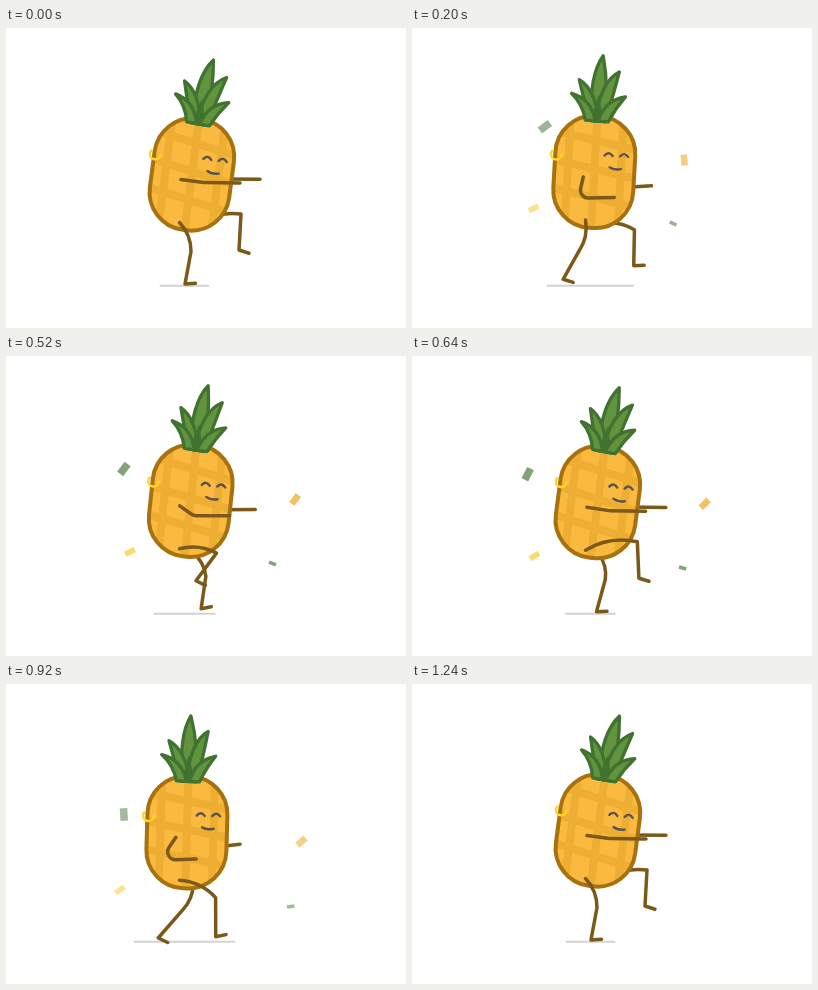
These frames come from a looping animation (400 by 300 pixels, 1.28 s). An HTML page with a canvas:

```html
<!DOCTYPE html>
<html lang="en">
<head>
<meta charset="utf-8">
<title>Dancing pineapple</title>
<style>
  html, body { margin: 0; width: 100%; height: 100%; overflow: hidden; background: #fff; }
  canvas { display: block; width: 400px; height: 300px; }
</style>
</head>
<body>
<canvas id="stage"></canvas>
<script>
const LOOP = 1280, TICK = 40, CYCLE = 1240;
const LIMB = '#7b5a19', FACE = '#5b5350';
const canvas = document.getElementById('stage');
const ctx = canvas.getContext('2d');
const scale = window.devicePixelRatio || 1;
canvas.width = 400 * scale;
canvas.height = 300 * scale;

// Evenly timed stride poses: knee x, y, ankle x, y (heights below the body centre)
const STRIDE = [
  [185, 77, 179, 109.5],
  [169.5, 79, 156.5, 107.5],
  [168, 76.5, 144.5, 105],
  [199.5, 61, 170, 85],
  [225, 39.5, 225, 75.5],
  [214, 54, 215.5, 89],
  [209, 66, 209, 105],
  [193, 74, 191.5, 107]
];

const rad = deg => deg * Math.PI / 180;
const arc = (peak, curve, offset) => peak + curve * offset * offset;

// Each path gives x, y and angle after s seconds
const CONFETTI = [
  { color: '#82a477', w: 12.5, h: 7.5,
    path: s => [arc(115.3, 65, s - 0.72), 90 + 44 * s, arc(-34, -70, s)] },
  { color: '#f3c165', w: 11, h: 6.5,
    path: s => [arc(295.5, -52, s - 0.87), 125 + 35.5 * s, arc(-40, -130, s - 0.85)] },
  { color: '#fbda6c', w: 10.5, h: 5.5,
    path: s => [arc(124.3, -45, s - 0.44), arc(207, -33, s - 1.1), arc(-24, -25, s - 0.2)] },
  { color: '#82a477', w: 7.5, h: 3.5,
    path: s => [arc(261, 40, s - 0.15), 188 + 37.5 * s, arc(27, -85, s - 0.28)] }
];

// Base ends, side controls and tip; curl moves the tip as the body tilts
const BACK_LEAVES = [
  { base: [-6, 7], left: [-12, -45], tip: [-0.8, -65.5], right: [9, -34], curl: 0.6 },
  { base: [-8, 2], left: [-15, -20], tip: [-21.4, -39.8], right: [-5, -32], curl: 0 },
  { base: [-2, 8], left: [0, -40], tip: [17.2, -50.7], right: [14, -28], curl: 0.4 }
];
const FRONT_LEAVES = [
  { base: [-12, -2], left: [-16, -16], tip: [-28, -25.5], right: [-8, -22], curl: 0 },
  { base: [1, 11], left: [6, -22], tip: [26, -26.4], right: [17, -14], curl: 0 }
];

function stroke(color, width) {
  ctx.strokeStyle = color;
  ctx.lineWidth = width;
  ctx.stroke();
}

function line(x1, y1, x2, y2, color, width) {
  ctx.beginPath();
  ctx.moveTo(x1, y1);
  ctx.lineTo(x2, y2);
  stroke(color, width);
}

function faceCurve(x1, y1, cx, cy, x2, y2) {
  ctx.beginPath();
  ctx.moveTo(x1, y1);
  ctx.quadraticCurveTo(cx, cy, x2, y2);
  stroke(FACE, 2.4);
}

// Smooth closed path through the stride poses, phase 0..1
function stride(phase) {
  const n = STRIDE.length, pos = phase % 1 * n, i = Math.floor(pos), u = pos - i;
  const [a, b, c, d] = [-1, 0, 1, 2].map(k => STRIDE[(i + k + n) % n]);
  return b.map((v, k) => v + u / 2 * (c[k] - a[k] +
    u * (2 * a[k] - 5 * v + 4 * c[k] - d[k] + u * (3 * (v - c[k]) + d[k] - a[k]))));
}

function leg(phase, bodyY, hipX, hipY, kneeShift, footShift) {
  const pose = stride(phase);
  const kx = pose[0] + kneeShift, ky = pose[1] + bodyY;
  const ax = pose[2] + footShift, ay = pose[3] + bodyY;
  const dx = kx - hipX, dy = ky - hipY;
  const pitch = rad(7 + 22 * Math.cos(2 * Math.PI * phase - 2.1));
  ctx.beginPath();
  ctx.moveTo(hipX, hipY);
  ctx.quadraticCurveTo(hipX + dx / 2 + dy * 0.2, hipY + dy / 2 - dx * 0.2, kx, ky);
  ctx.lineTo(ax, ay);
  ctx.lineTo(ax + 10.5 * Math.cos(pitch), ay + 10.5 * Math.sin(pitch));
  stroke(LIMB, 3.5);
}

function confetti(time) {
  ctx.globalAlpha = Math.min(1, time / 250, (CYCLE - time) / 430);
  for (const { color, w, h, path } of CONFETTI) {
    const [x, y, angle] = path(time / 1000);
    ctx.save();
    ctx.translate(x, y);
    ctx.rotate(rad(angle));
    ctx.fillStyle = color;
    ctx.fillRect(-w / 2, -h / 2, w, h);
    ctx.restore();
  }
  ctx.globalAlpha = 1;
}

function leaf({ base, left, tip, right, curl }, tilt) {
  const tipX = tip[0] - tip[1] * Math.sin(rad(curl * (tilt - 1.5)));
  ctx.beginPath();
  ctx.moveTo(base[0], 0);
  ctx.quadraticCurveTo(...left, tipX, tip[1]);
  ctx.quadraticCurveTo(...right, base[1], 0);
  ctx.closePath();
  ctx.fillStyle = '#62933e';
  ctx.fill();
  stroke('#407230', 3.3);
}

function crown(tilt) {
  ctx.translate(0, -51);
  ctx.rotate(rad(tilt * 0.3 + 0.5));
  BACK_LEAVES.forEach(shape => leaf(shape, tilt));
  ctx.beginPath();
  ctx.moveTo(-7, 0);
  ctx.lineTo(-1, -26);
  ctx.lineTo(7, 0);
  ctx.fillStyle = '#407230';
  ctx.fill();
  FRONT_LEAVES.forEach(shape => leaf(shape, tilt));
}

function fruit(x, y, tilt) {
  ctx.save();
  ctx.translate(x, y);
  ctx.rotate(rad(tilt));

  const shell = new Path2D();
  shell.roundRect(-40, -56, 80, 112, 38);
  ctx.fillStyle = '#fab93f';
  ctx.fill(shell);
  ctx.save();
  ctx.clip(shell);
  for (let i = -1; i <= 1; i++) {
    line(i * 26.5, -60, i * 26.5, 60, '#eeae34', 8);
    line(-42, i * 28.5 - 10.5, 42, i * 28.5 + 4.5, '#eeae34', 8);
  }
  ctx.restore();
  ctx.strokeStyle = '#a6710e';
  ctx.lineWidth = 4;
  ctx.stroke(shell);

  ctx.beginPath();
  ctx.arc(-39, -15.5, 5.3, 0, rad(215));
  stroke('#ffd526', 2.5);

  for (const eye of [13.3, 28.8]) faceCurve(eye - 4, -17, eye, -22, eye + 4, -17);
  faceCurve(15, -5.5, 19.5, -2.6, 26.5, -4.4);

  crown(tilt);
  ctx.restore();
}

function draw(time) {
  const phase = time / CYCLE;
  const beat = 4 * Math.PI * phase;
  const sway = (mid, amount) => mid + amount * Math.cos(beat);
  const x = sway(183.4, 2.5), tilt = sway(4.6, 2.9);
  const y = 145.5 + 2 * Math.cos(2 * beat) - 1.3 * Math.cos(beat - 0.7);
  const shadow = sway(37, -13);

  ctx.setTransform(scale, 0, 0, scale, 0, 0);
  ctx.fillStyle = '#fff';
  ctx.fillRect(0, 0, 400, 300);
  ctx.lineCap = ctx.lineJoin = 'round';

  line(178.5 - shadow, 257.8, 178.5 + shadow, 257.8, '#d3d3d3', 2);
  confetti(time);
  line(215, sway(156.8, -5.8), sway(244, 10), sway(155.8, -4.5), LIMB, 3.5);
  leg(phase + 0.5, y, 187, y + 52, 10, 8);
  fruit(x, y, tilt);
  leg(phase, y, 173.5, y + 48, 0, 0);

  const hand = [sway(212, 22), sway(165, -10)];
  ctx.beginPath();
  ctx.moveTo(x - 11, y + 5);
  ctx.arcTo(sway(176, 22), sway(165.5, -11), ...hand, 8);
  ctx.lineTo(...hand);
  stroke(LIMB, 3.5);
}

function frame() {
  const time = performance.now() % LOOP;
  draw(Math.floor(time / TICK) * TICK % CYCLE);
  requestAnimationFrame(frame);
}
frame();
</script>
</body>
</html>
```
